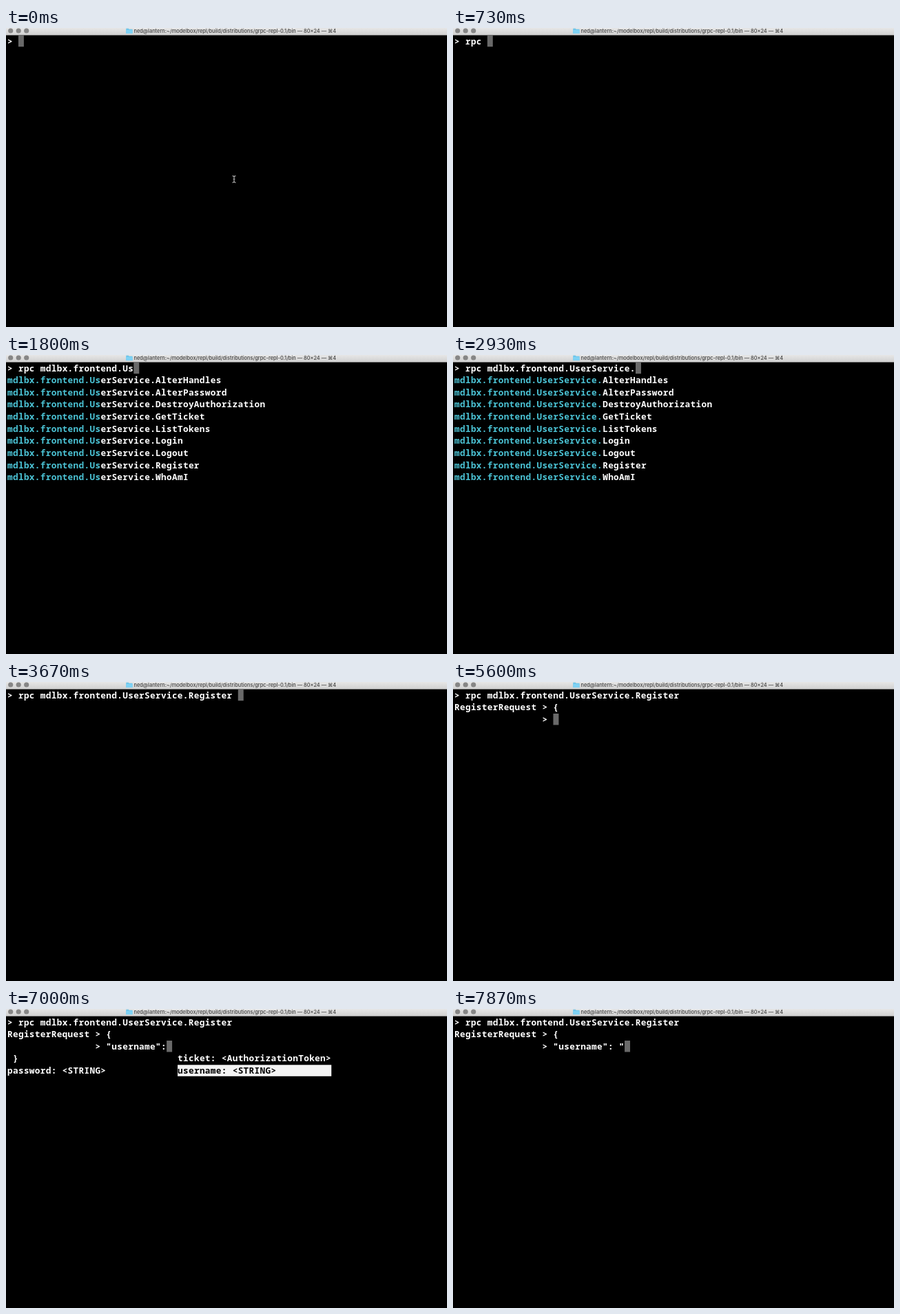
An HTML page for the animation above (8 s loop, 640 by 435 pixels).

```html
<!DOCTYPE html>
<html lang="en">
<head>
<meta charset="utf-8">
<title>Terminal</title>
<style>
  html, body { margin: 0; width: 100%; height: 100%; overflow: hidden; background: #000; }
  svg { display: block; }
  #screen text {
    font: 600 12.7px "Noto Sans Mono", "DejaVu Sans Mono", monospace;
    letter-spacing: .35px;
    white-space: pre;
    fill: #fff;
  }
  #screen .match { fill: #4bc3d5; }
  #screen .picked { fill: #000; }
  #screen .prompt { font-weight: 800; }
  #title { font: 500 7.4px Inter, Roboto, sans-serif; fill: #404040; }
</style>
</head>
<body>
<svg width="640" height="435" viewBox="0 0 640 435">
  <defs>
    <linearGradient id="bar" x2="0" y2="1">
      <stop stop-color="#e6e6e6"/>
      <stop offset="1" stop-color="#d0d0d0"/>
    </linearGradient>
  </defs>
  <rect width="640" height="435"/>
  <rect width="640" height="10.5" fill="url(#bar)"/>
  <g fill="#868686">
    <circle cx="6.7" cy="4" r="3.6"/>
    <circle cx="18.2" cy="4" r="3.6"/>
    <circle cx="29.7" cy="4" r="3.6"/>
  </g>
  <path d="M174.3 .8h3.4l1 1h4.8v6.3h-9.2z" fill="#67c3ea"/>
  <path d="M174.3 2.7h9.2v5.4h-9.2z" fill="#7fd2f4"/>
  <text id="title" x="185.5" y="6.8">ned@lantern:~/modelbox/repl/build/distributions/grpc-repl-0.1/bin — 80×24 — ⌘4</text>
  <g id="screen"></g>
  <path id="mouse" d="M328.5 215.2q2.5 0 2.5 1.8q0 -1.8 2.5 -1.8M331 217v6M329.5 220h3M328.5 224.8q2.5 0 2.5 -1.8q0 1.8 2.5 1.8" fill="none" stroke="#a8a8a8" stroke-width="1.2"/>
</svg>
<script>
const LOOP = 8000;
const CELL_W = 7.97, CELL_H = 17.65, LEFT = 2, TOP = 10.7;
const MENU_COLS = 28;
const PKG = 'mdlbx.frontend.', USER = PKG + 'UserService.';
const METHODS = [
  ...['AnnotationArchetypes', 'CannedSearch', 'MultiWatch', 'SingleWatch'].map(m => 'ModelService.' + m),
  'TransactionService.Execute',
  ...['AlterHandles', 'AlterPassword', 'DestroyAuthorization', 'GetTicket', 'ListTokens',
      'Login', 'Logout', 'Register', 'WhoAmI'].map(m => 'UserService.' + m)
].map(m => PKG + m);
const FIELDS = [
  { row: 3, col: 0, label: ' }', value: ' }' },
  { row: 4, col: 0, label: 'password: <STRING>', value: '"password":' },
  { row: 3, col: 31, label: 'ticket: <AuthorizationToken>', value: '"ticket":' },
  { row: 4, col: 31, label: 'username: <STRING>', value: '"username":' }
];

const px = col => (LEFT + col * CELL_W).toFixed(2);
const py = (row, dy = 0) => (TOP + row * CELL_H + dy).toFixed(2);
const escape = s => s.replace(/&/g, '&amp;').replace(/</g, '&lt;').replace(/>/g, '&gt;');

const text = (row, col, s, cls = '') =>
  `<text class="${cls}" x="${px(col)}" y="${py(row, 12.8)}">${escape(s)}</text>`;
const block = (row, col, cols, fill) =>
  `<rect x="${px(col)}" y="${py(row)}" width="${cols * CELL_W}" height="16.5" fill="${fill}"/>`;
const cursor = (row, col) => block(row, col, 1, '#696969');
const typed = (row, s) => text(row, 0, s) + cursor(row, s.length);

const prompt = s => text(0, 0, '>', 'prompt') + text(0, 2, s);
const start = s => prompt(s) + cursor(0, 2 + s.length);
const command = s => start('rpc ' + s);

// Command line with its matching methods below
const complete = s => command(s) + METHODS.filter(m => m.startsWith(s)).map((m, i) =>
  text(i + 1, 0, s, 'match') + text(i + 1, s.length, m.slice(s.length))).join('');

const sent = prompt('rpc ' + USER + 'Register');
const request = s => sent + typed(1, 'RegisterRequest > ' + s);
const body = s => sent + text(1, 0, 'RegisterRequest > {') + typed(2, ' '.repeat(16) + '> ' + s);

// Field menu; pick is the highlighted entry
const menu = pick => body(pick < 0 ? '' : FIELDS[pick].value) +
  FIELDS.map(({ row, col, label }, i) => i === pick
    ? block(row, col, MENU_COLS, '#f4f4f4') + text(row, col, label, 'picked')
    : text(row, col, label)).join('');

const STEPS = [
  [0, start('')],
  [470, start('r')],
  [530, start('rp')],
  [670, start('rpc')],
  [730, start('rpc ')],
  [930, command(PKG)],
  [1000, complete(PKG)],
  [1730, complete(PKG + 'U')],
  [1800, complete(PKG + 'Us')],
  [1930, complete(PKG + 'Use')],
  [2000, complete(USER)],
  [3000, complete(USER + 'R')],
  [3070, complete(USER + 'Re')],
  [3130, complete(USER + 'Reg')],
  [3670, command(USER + 'Register ')],
  [4270, sent + cursor(1, 0)],
  [4330, request('')],
  [5130, request('{')],
  [5600, body('')],
  [5870, menu(-1)],
  [6330, menu(0)],
  [6530, menu(1)],
  [6800, menu(2)],
  [7000, menu(3)],
  [7800, body('"username": ')],
  [7870, body('"username": "')]
];

const screen = document.getElementById('screen');
const mouse = document.getElementById('mouse');
let shown = -1;

function draw(ms) {
  const step = STEPS.findLastIndex(([at]) => at <= ms);
  if (step === shown) return;
  shown = step;
  screen.innerHTML = STEPS[step][1];
  mouse.style.display = step === 0 ? '' : 'none';
}

const begin = performance.now();
function tick() {
  draw((performance.now() - begin) % LOOP);
  requestAnimationFrame(tick);
}
tick();
</script>
</body>
</html>
```
